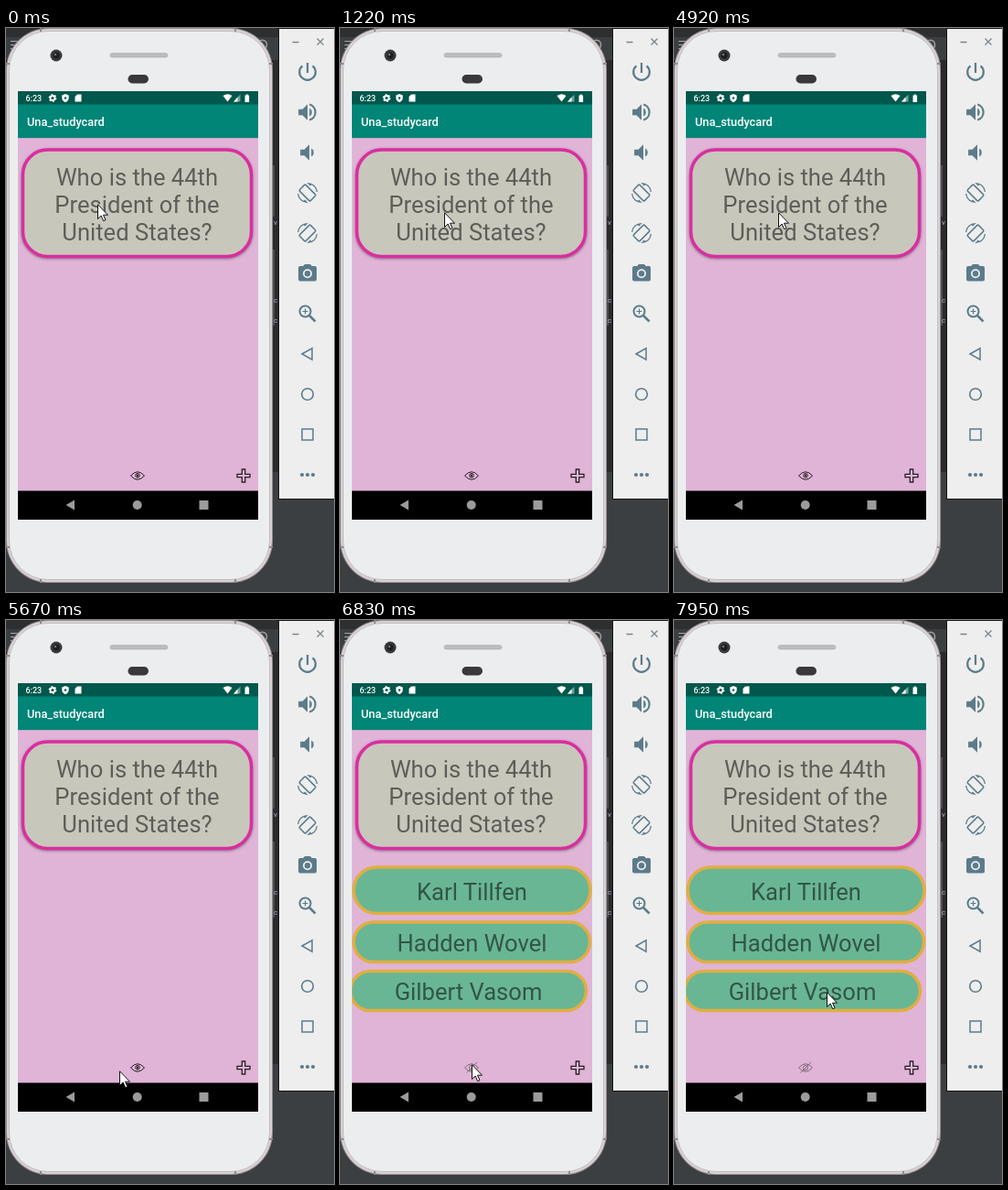
An HTML page that plays this animation: 359x616 px, repeating every 8000 ms.

```html
<!DOCTYPE html>
<html lang="en">
<head>
<meta charset="utf-8">
<title>Flashcard app</title>
<style>
  html, body { margin: 0; width: 100%; height: 100%; overflow: hidden; background: #3c3f41; }
  svg { display: block; width: 359px; height: 616px; }
  text { font-family: Roboto, sans-serif; }
  .big { font-size: 25.6px; text-anchor: middle; fill: #000; }
  .muted { fill-opacity: .53; }
  .card { filter: drop-shadow(0 1px 1.5px rgba(0, 0, 0, .4)); }
  .icons { fill: #5c7b8a; }
  .line { fill: none; stroke: #5c7b8a; }

  .question, .answer, .choices, .eye, #cursor { animation: 8s step-end infinite; }
  .question { animation-name: question; }
  .answer { animation-name: answer; visibility: hidden; }
  .choices { animation-name: choices; visibility: hidden; }
  .eye { animation-name: eye; }
  #cursor { animation-name: cursor; }

  @keyframes question {
    0%, 61.5% { visibility: visible; }
    32.25% { visibility: hidden; }
  }
  @keyframes answer {
    0%, 61.5% { visibility: hidden; }
    32.25% { visibility: visible; }
  }
  @keyframes choices {
    0% { visibility: hidden; }
    85.375%, 100% { visibility: visible; }
  }
  @keyframes eye {
    0% { visibility: visible; }
    85.375%, 100% { visibility: hidden; }
  }
  @keyframes cursor {
    0% { transform: translate(100px, 192px); }
    3.5% { transform: translate(102px, 192px); }
    5.25% { transform: translate(106px, 198px); }
    6.75% { transform: translate(111px, 205px); }
    8.25% { transform: translate(115px, 210px); }
    11.875% { transform: translate(115px, 205px); }
    13.625% { transform: translate(115px, 203px); }
    15.25% { transform: translate(114px, 201px); }
    69% { transform: translate(101px, 378px); }
    70.875% { transform: translate(124px, 492px); }
    74.5% { transform: translate(136px, 471px); }
    76.375% { transform: translate(142px, 470px); }
    78.25% { transform: translate(143px, 478px); }
    79.75% { transform: translate(144px, 485px); }
    94.625% { transform: translate(148px, 470px); }
    96.125% { transform: translate(155px, 446px); }
    97.75% { transform: translate(162px, 423px); }
    99.375%, 100% { transform: translate(167px, 406px); }
  }
</style>
</head>
<body>
<svg viewBox="0 0 359 616">
  <defs>
    <clipPath id="screen"><rect x="13" y="69" width="263" height="468"/></clipPath>
    <path id="speaker" d="M-9-3v6h4l5 5V-8l-5 5zM2-4a4.500 4.500 0 0 1 0 8z"/>
    <g id="rotate">
      <rect class="line" x="-5.200" y="-9.200" width="10.400" height="18.400" rx="1.500" stroke-width="1.600" transform="rotate(-45)"/>
      <path id="arc" class="icons" d="M4.500-9.500a10.500 10.500 0 0 1 6 8.500h1.500a12 12 0 0 0-12-11l-.700 0 3.800 3.800z"/>
      <use href="#arc" transform="rotate(180)"/>
    </g>
    <path id="outline" d="M136.500 489q7.500-8.500 15 0q-7.500 8.500-15 0z"/>
  </defs>

  <!-- desktop behind the phone -->
  <rect width="359" height="616" fill="#3c3f41"/>
  <rect width="299" height="10" fill="#2d2f31"/>
  <rect y="35" width="299" height="450" fill="#2b2b2d"/>
  <path d="M5 14.500h10M5 18.500h10M5 22.500h10" stroke="#a5a8aa"/>
  <path d="M278 14a5 5 0 1 1 1 9" fill="none" stroke="#9a9da0" stroke-width="1.500"/>
  <path d="M293 150v56M293 242v83" stroke="#747375"/>
  <g fill="#a9b7c6" font-size="8">
    <text x="293" y="215">v</text>
    <text x="293" y="300">c</text>
    <text x="293" y="322">c</text>
  </g>

  <!-- phone body -->
  <rect x="0" y="0" width="292" height="606" rx="46" fill="#979194"/>
  <rect x="1" y="1" width="290" height="604" rx="45" fill="#d8d2d5"/>
  <rect x="3.500" y="3.500" width="285" height="599" rx="42.500" fill="#ecedef" stroke="#c3bdc0"/>
  <path d="M0 39h4M288 39h4M0 567h4M288 567h4M38 0v4M251 0v4M38 602v4M251 602v4" stroke="#8e898c" stroke-width="2"/>
  <circle cx="55" cy="30" r="6.500" fill="#3a3a3c"/>
  <circle cx="55" cy="30" r="3.500" fill="#1c1d20"/>
  <circle cx="54" cy="29" r="1.300" fill="#6d7580"/>
  <rect x="114" y="27.500" width="63" height="4.500" rx="2.200" fill="#bcbcbe" stroke="#a9a9ab" stroke-width=".6"/>
  <rect x="133.500" y="51" width="22.500" height="9.500" rx="4.700" fill="#39393b"/>

  <!-- app screen -->
  <rect x="13" y="69" width="263" height="468" fill="#e0b4d6"/>
  <rect x="13" y="120" width="263" height="1" fill="#cfa6c6"/>
  <rect x="13" y="69" width="263" height="15" fill="#00574b"/>
  <rect x="13" y="83.500" width="263" height="36.500" fill="#008577"/>
  <rect x="13" y="505.500" width="263" height="31.500" fill="#000"/>
  <g fill="#fff">
    <text x="21.500" y="80" font-size="9" font-weight="500">6:23</text>
    <text x="23" y="107" font-size="12.800" font-weight="500">Una_studycard</text>
    <circle cx="51" cy="76.500" r="2.500" fill="none" stroke="#fff" stroke-width="1.800"/>
    <circle cx="51" cy="76.500" r="3.800" fill="none" stroke="#fff" stroke-width="1.200" stroke-dasharray="1.800 2.180"/>
    <path d="M65 72l3.700 1.500v3q0 3-3.700 4.800q-3.700-1.800-3.700-4.800v-3z"/>
    <circle cx="65" cy="76.500" r="1.200" fill="#00574b"/>
    <path d="M78 72.500h4.500v8H75.500v-5.500z"/>
    <path d="M237.500 74q5-3.500 10 0l-5 6.500z"/>
    <path d="M249 80.500l7.500-8v8z" opacity=".45"/>
    <path d="M249 80.500l4.500-5v5z"/>
    <path d="M261.500 73.500h1.300v-1h2v1h1.300v7.500h-4.600z"/>
  </g>
  <g fill="#9b9b9b">
    <path d="M65.500 521l9.500-5.500v11z"/>
    <circle cx="143.700" cy="521" r="5"/>
    <rect x="211.500" y="516" width="10" height="10"/>
  </g>
  <path d="M258.300 482h3.400v5.300h5.300v3.400h-5.300v5.300h-3.400v-5.300h-5.300v-3.400h5.300z" fill="#e0b4d6" stroke="#2a2027" stroke-width="1.300"/>

  <g class="question">
    <rect class="card" x="18.500" y="133" width="250" height="116.500" rx="27" fill="#c8c7bc" stroke="#da2ea0" stroke-width="3.500"/>
    <text class="big muted"><tspan x="143.500" y="172">Who is the 44th</tspan><tspan x="143.500" y="202">President of the</tspan><tspan x="143.500" y="232">United States?</tspan></text>
  </g>

  <g class="answer">
    <rect class="card" x="29.500" y="148" width="233" height="98.500" rx="27" fill="#009245" stroke="#000" stroke-width="3.500"/>
    <text class="big" x="145.500" y="207.500" fill-opacity=".87">Hadden Wovel</text>
  </g>

  <g class="choices">
    <g fill="#69b694" stroke="#e0ae42" stroke-width="3.500" clip-path="url(#screen)">
      <rect x="15" y="270" width="259" height="50.500" rx="25"/>
      <rect x="15" y="330" width="258.500" height="43.500" rx="21.700"/>
      <rect x="11.500" y="383.500" width="258" height="43" rx="21.500"/>
    </g>
    <text class="big muted" x="144.500" y="305.500">Karl Tillfen</text>
    <text class="big muted" x="144.500" y="361.500">Hadden Wovel</text>
    <text class="big muted" x="140.500" y="415">Gilbert Vasom</text>
    <g fill="none" stroke="#806878">
      <use href="#outline"/>
      <circle cx="144" cy="489" r="2.500"/>
      <path d="M138.500 494.500l11.500-11.500"/>
    </g>
  </g>
  <g class="eye" fill="none" stroke="#2a2027">
    <use href="#outline"/>
    <circle cx="144" cy="488.800" r="2.300"/>
    <circle cx="144" cy="488.800" r="1.200" fill="#2a2027" stroke="none"/>
  </g>

  <!-- emulator toolbar -->
  <rect x="298" y="0" width="61" height="515" fill="#141414"/>
  <rect x="299" y="1" width="60" height="513" fill="#eeeeee"/>
  <path d="M313.500 15.500h7M340.500 11.500l7 7m0-7l-7 7" stroke="#7a868c" stroke-width="1.300"/>
  <path class="line" transform="translate(330 48) scale(1.1)" d="M-5.100-6.100a8 8 0 1 0 10.200 0M0-9V1" stroke-width="2"/>
  <g transform="translate(330 92) scale(1.1)">
    <use href="#speaker" class="icons"/>
    <path class="line" d="M2-7.700a8 8 0 0 1 0 15.400" stroke-width="2"/>
  </g>
  <use href="#speaker" class="icons" transform="translate(332 136) scale(1.1)"/>
  <use href="#rotate" transform="translate(330 180) scale(.92)"/>
  <use href="#rotate" transform="translate(330 224) scale(-.92 .92)"/>
  <g transform="translate(330 268)">
    <path class="icons" d="M-3-10h6l1.800 2H8q2 0 2 2V6.500q0 2-2 2H-8q-2 0-2-2V-6q0-2 2-2h3.200z"/>
    <circle r="4.100" cy=".300" fill="#5c7b8a" stroke="#eee" stroke-width="1.800"/>
  </g>
  <g class="line" transform="translate(327.500 309.500)">
    <circle r="6" stroke-width="2"/>
    <path d="M4.500 4.500l6.500 6.500" stroke-width="2.500"/>
    <path d="M-3 0h6M0-3v6" stroke-width="1.200"/>
  </g>
  <path class="line" d="M324 356l11-6.200v12.400z" stroke-width="1.500"/>
  <circle class="line" cx="330" cy="400" r="6.300" stroke-width="1.600"/>
  <rect class="line" x="324" y="438" width="12" height="12" stroke-width="1.500"/>
  <g class="icons">
    <circle cx="324" cy="488" r="2.100"/>
    <circle cx="330" cy="488" r="2.100"/>
    <circle cx="336" cy="488" r="2.100"/>
  </g>

  <g id="cursor">
    <path d="M.5.800v15.700l3.700-3.500 2.500 5.700 2.300-1-2.500-5.500h5z" fill="#fff" stroke="#111"/>
  </g>
</svg>
</body>
</html>
```
